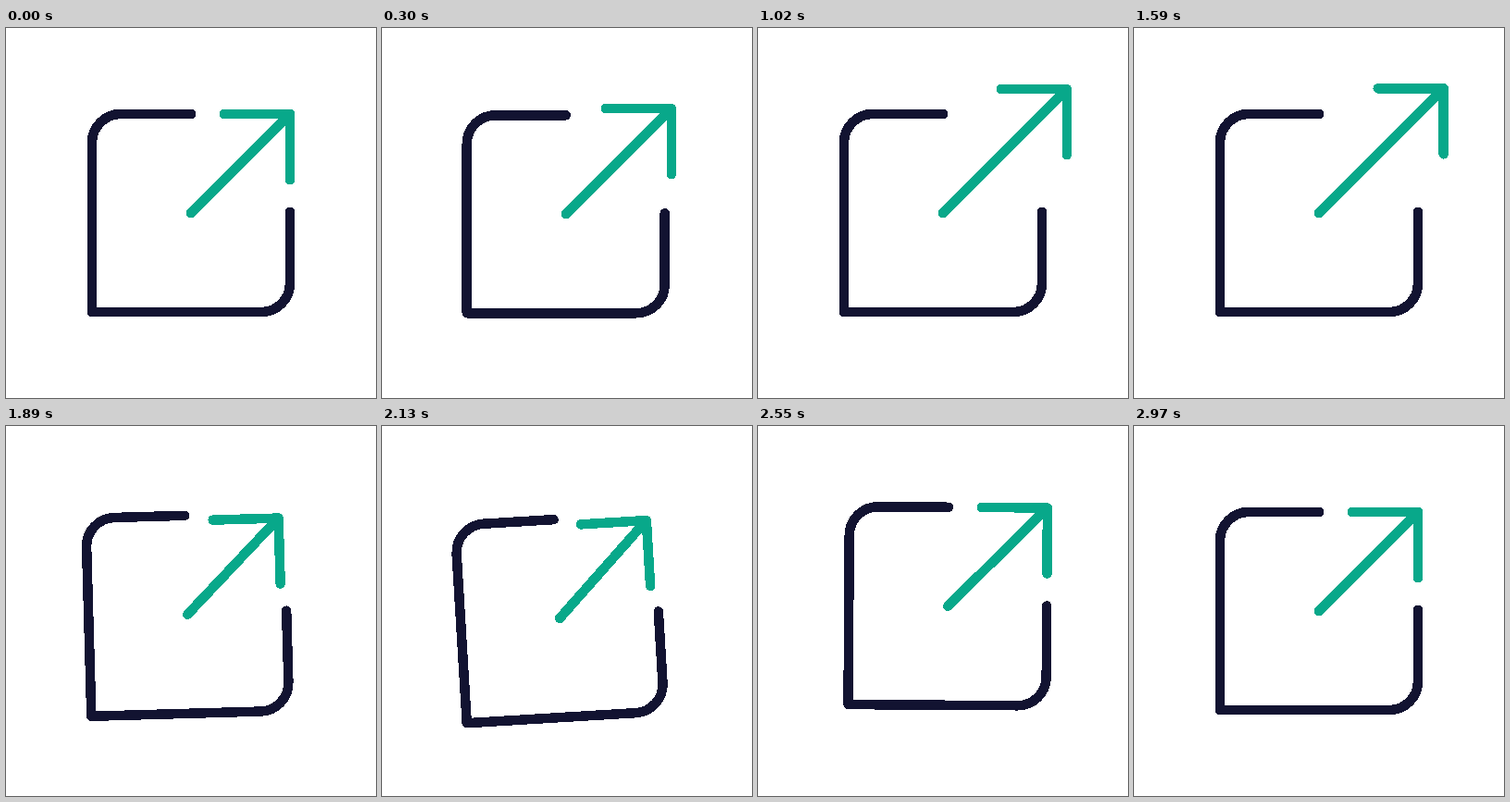
Animation, 400 px wide and 400 px high, one loop 5090 ms. Source, as an HTML page:

```html
<!DOCTYPE html>
<html lang="en">
<head>
<meta charset="utf-8">
<title>Open link icon</title>
<style>
  html, body { margin: 0; width: 100%; height: 100%; overflow: hidden; background: #fff; }
  svg { display: block; width: 100%; height: 100%; }
  path {
    fill: none; stroke-width: 10.5; stroke-linecap: round; stroke-linejoin: round;
    shape-rendering: crispEdges;
  }
</style>
</head>
<body>
<svg viewBox="0 0 400 400">
  <g id="icon">
    <path stroke="#121331" d="M200 93H124A31 31 0 0 0 93 124V307H276A31 31 0 0 0 307 276V199"/>
    <path id="arrow" stroke="#08a88a"/>
  </g>
</svg>
<script>
const LOOP = 5090, STEP = 30;
const icon = document.getElementById('icon');
const arrow = document.getElementById('arrow');

const sine = p => (1 - Math.cos(Math.PI * p)) / 2;
const inOut = n => p => p < 0.5 ? (2 * p) ** n / 2 : 1 - (2 - 2 * p) ** n / 2;
const ramp = (t, from, to, ease = sine) =>
  ease(Math.min(1, Math.max(0, (t - from) / (to - from))));

// Wind-up before the arrow flies out
const windUp = t => Math.sin(Math.PI * Math.min(1, t / 345)) ** 2;

// Swing back by one amount, rebound to another, then rest
const recoil = (t, back, rebound) =>
  back * ramp(t, 1640, 2160) +
  (rebound - back) * ramp(t, 2160, 2570) -
  rebound * ramp(t, 2570, 2970);

// Arrow flies out, floats for one cycle, snaps in past its place and settles
function reach(t) {
  const peak = 440, period = 820;
  const floatTime = Math.min(t, peak + period) - peak;
  const float = 28 + 4 * Math.cos(2 * Math.PI * floatTime / period);
  return float * ramp(t, 200, peak, inOut(4)) -
    39 * ramp(t, peak + period, 2150, inOut(5)) +
    7 * ramp(t, 2150, 2500);
}

function draw(t) {
  const shift = recoil(t, -8, 5.3) - 8 * windUp(t);
  const tilt = recoil(t, -3.5, 0.4);
  const r = reach(t), x = 307 + r, y = 93 - r;
  icon.setAttribute('transform', `translate(${shift} ${-shift}) rotate(${tilt} 200 200)`);
  arrow.setAttribute('d', `M${x - 71} ${y}H${x}V${y + 71}M${x} ${y}L200 200`);
}

const start = performance.now();
function tick() {
  const t = (performance.now() - start) % LOOP;
  draw(Math.floor(t / STEP) * STEP);
  requestAnimationFrame(tick);
}
tick();
</script>
</body>
</html>
```
